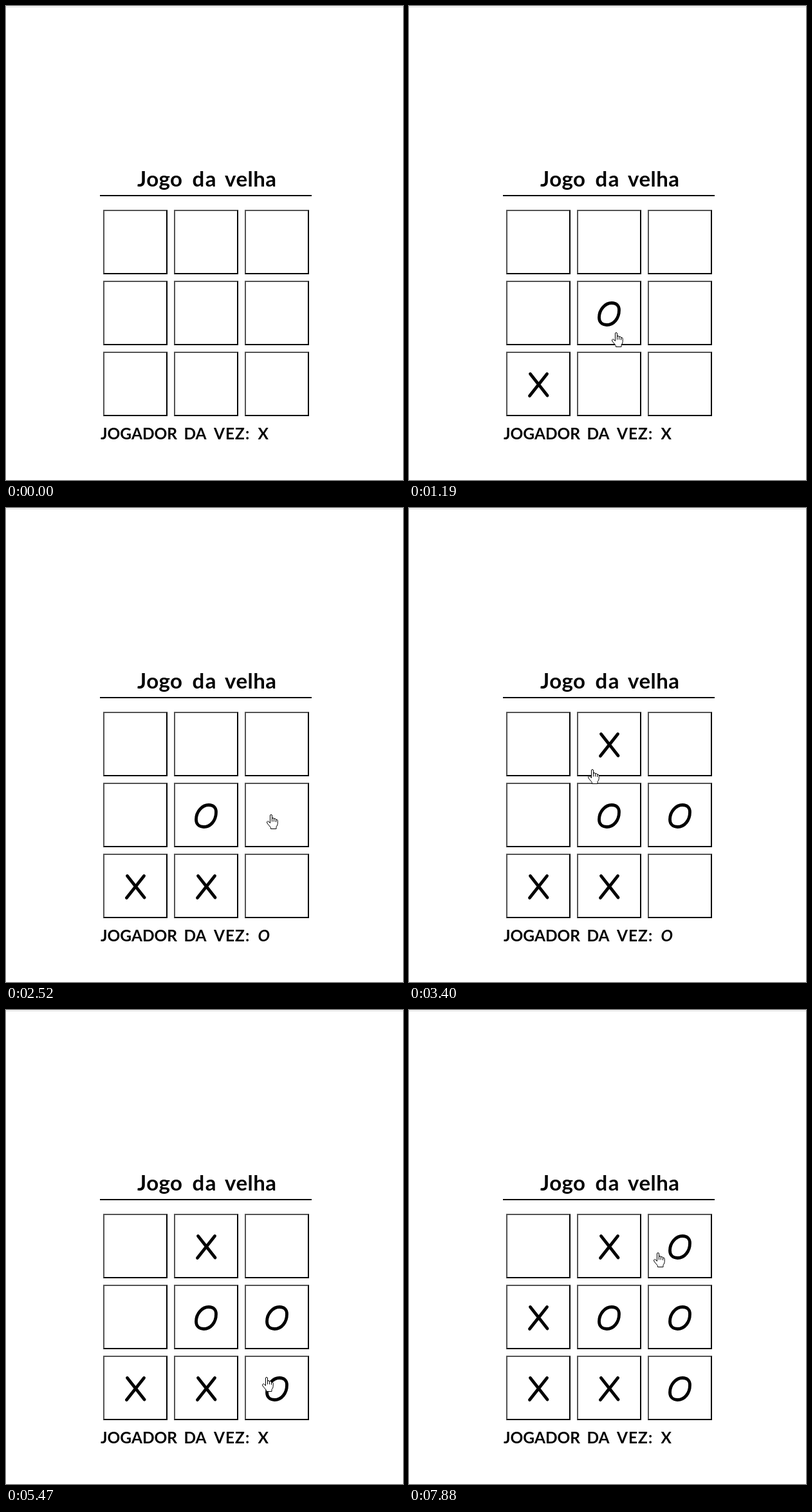
Animation of 617 by 735 pixels, one loop 8 s. Source, as an HTML page:

```html
<!DOCTYPE html>
<html lang="pt">
<head>
<meta charset="utf-8">
<title>Jogo da velha</title>
<style>
  html, body { margin: 0; width: 100%; height: 100%; overflow: hidden; background: #fff; }
  svg { position: absolute; left: 0; top: 0; display: block; }
  text { font-family: Lato, "Open Sans", sans-serif; font-weight: 700; }
  .title { font-size: 33px; letter-spacing: .5px; }
  .turn { font-size: 24.5px; }
  .cell {
    position: absolute; box-sizing: border-box; width: 100px; height: 100px;
    border: 2px solid; border-color: #545454 #000 #000 #545454;
  }
  .cell.down { border-color: #000 #545454 #545454 #000; }
  .mark { fill: none; stroke: #000; stroke-width: 4.8; stroke-linecap: round; }
  .pointer { fill: #fff; stroke: #000; stroke-linejoin: round; }
</style>
</head>
<body>
<div id="board"></div>
<svg width="617" height="735" viewBox="0 0 617 735">
  <defs>
    <path id="X" d="M-12.5-15.5L14 18M13.5-15.5L-13.5 18.5"/>
    <path id="O" d="M4-15.5C11.5-15.5 15.5-11.5 15.5-4.5C15.5 8.5 7 18.5-3.5 18.5C-11 18.5-15.5 14-15.5 7C-15.5-5.5-6-15.5 4-15.5Z"/>
  </defs>
  <rect y="1" width="617" height="1" fill="#dcdcdc"/>
  <rect x="146" y="293" width="329" height="2"/>
  <text class="title" y="280"><tspan x="204">Jogo </tspan><tspan x="289.5" letter-spacing="1.5">da </tspan><tspan x="340">velha</tspan></text>
  <text class="turn" y="672"><tspan x="147">JOGADOR </tspan><tspan x="276.5">DA </tspan><tspan x="323" letter-spacing="1">VEZ: </tspan><tspan x="391.5" id="who">X</tspan></text>
  <g id="marks" class="mark"></g>
  <g id="cursor" class="pointer">
    <g id="hand">
      <path d="M5.5 13.5V2Q5.5.5 7 .5T8.5 2V7Q8.7 5.6 10 5.6T11.5 7.2Q12 6.4 13 6.5T14.5 8.3Q17.2 7.4 17.2 10V14.5Q17.2 17 15 19.5V22.5H6.5V20.5L1 14Q-.4 11.5 1.8 10.6Q3 10.3 5.5 13.5Z"/>
      <path d="M8.5 7V11.5M11.5 7V11.5M14.5 8.3V12" fill="none"/>
    </g>
    <path id="arrow" d="M6.5.5V16.5L10.2 13L12.7 18.6L15 17.6L12.6 12H17.6Z"/>
  </g>
</svg>
<script>
const LOOP = 8000, STEP = 200 / 3;   // the screen refreshes 15 times a second
const SIZE = 100, PITCH = 110, LEFT = 151, TOP = 316, TIP = 6;

// one row per turn, times in steps: the pointer glides to (x, y), then clicks
const turns = [
  { go: 0,   stop: 6,   x: 219, y: 583, click: 10 },
  { go: 10,  stop: 16,  x: 315, y: 506, click: 18 },
  { go: 20,  stop: 23,  x: 314, y: 561, click: 29 },
  { go: 30,  stop: 38,  x: 405, y: 475, click: 41 },
  { go: 42,  stop: 48,  x: 278, y: 405, click: 51 },
  { go: 54,  stop: 62,  x: 398, y: 569, click: 68 },
  { go: 82,  stop: 93,  x: 240, y: 444, click: 98 },
  { go: 102, stop: 107, x: 380, y: 376, click: 118 }
];
const entry = { x: 565, y: 722 };

const $ = id => document.getElementById(id);
const show = (el, on) => el.style.display = on ? '' : 'none';
const ease = f => f * f * (3 - 2 * f);

const cells = Array.from({ length: 9 }, (_, i) => {
  const el = document.createElement('div');
  const x = LEFT + i % 3 * PITCH, y = TOP + Math.floor(i / 3) * PITCH;
  el.className = 'cell';
  el.style.left = x + 'px';
  el.style.top = y + 'px';
  $('board').append(el);
  return { el, x, y };
});

const cellAt = ({ x, y }) => cells.find(c =>
  x + TIP >= c.x && x + TIP < c.x + SIZE && y >= c.y && y < c.y + SIZE);

turns.forEach((turn, n) => {
  turn.cell = cellAt(turn);
  turn.mark = document.createElementNS('http://www.w3.org/2000/svg', 'use');
  turn.mark.setAttribute('href', n % 2 ? '#O' : '#X');
  turn.mark.setAttribute('transform',
    `translate(${turn.cell.x + SIZE / 2} ${turn.cell.y + SIZE / 2})`);
  $('marks').append(turn.mark);
});

function pointerAt(step) {
  let from = entry, to = entry, f = 0;
  for (const turn of turns) {
    if (step < turn.go) break;
    from = to;
    to = turn;
    f = ease(Math.min(1, (step - turn.go) / (turn.stop - turn.go)));
  }
  const mix = (a, b) => Math.round(a + (b - a) * f);
  return { x: mix(from.x, to.x), y: mix(from.y, to.y) };
}

function draw(t) {
  const step = Math.floor((t + 15) / STEP);
  for (const { cell, mark, click } of turns) {
    show(mark, step >= click);
    cell.el.classList.toggle('down', step === click - 1);
  }
  const next = turns.filter(turn => step >= turn.click).length % 2 ? 'O' : 'X';
  $('who').textContent = next;
  $('who').style.fontStyle = next === 'O' ? 'italic' : 'normal';

  const p = pointerAt(step), hand = !!cellAt(p);
  show($('cursor'), step > 0);
  $('cursor').setAttribute('transform', `translate(${p.x} ${p.y})`);
  show($('hand'), hand);
  show($('arrow'), !hand);
}

function tick() {
  draw(performance.now() % LOOP);
  requestAnimationFrame(tick);
}
tick();
</script>
</body>
</html>
```
